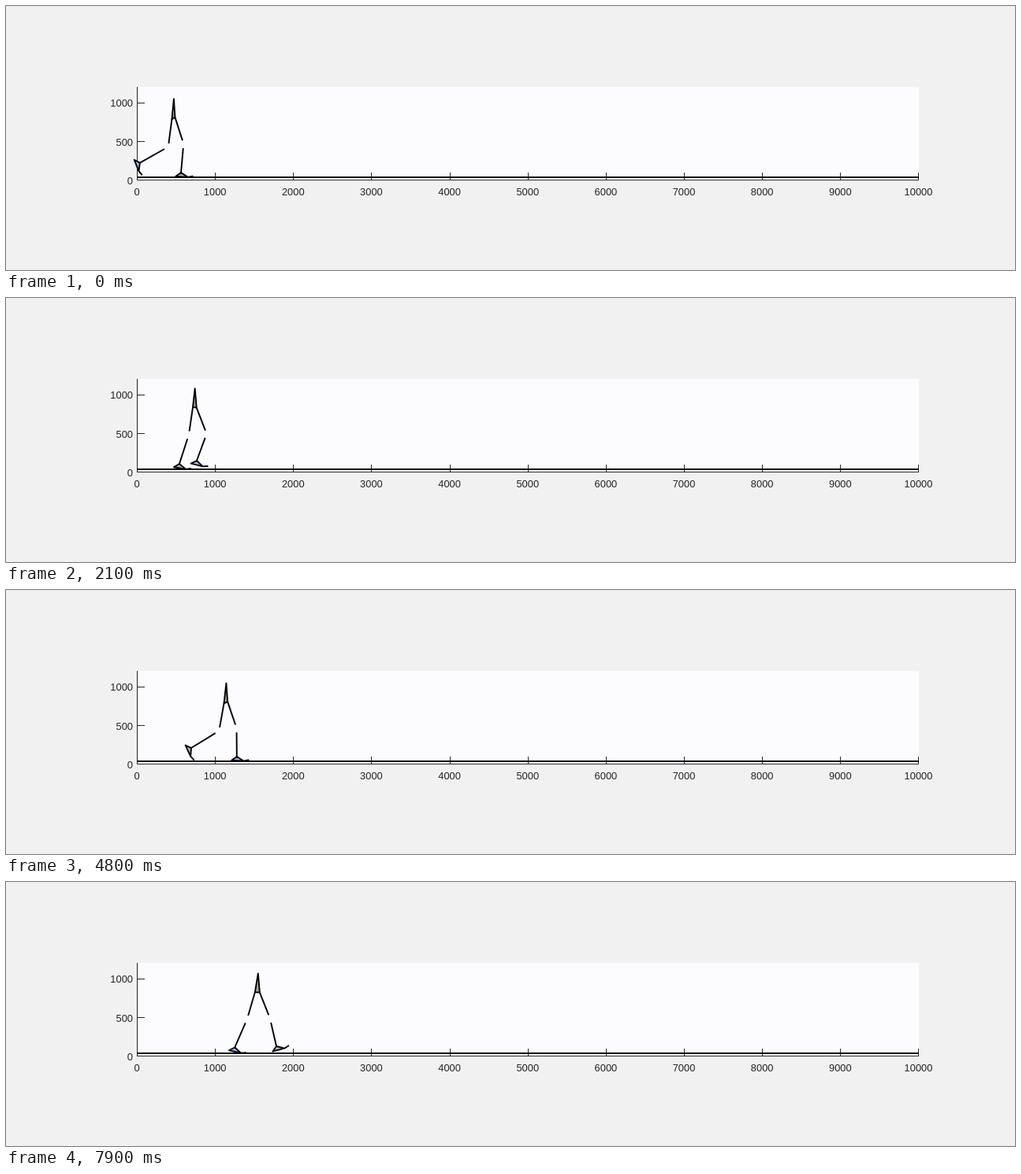
These frames come from a looping animation (1280x336 px, 8000 ms). An HTML page:

```html
<!DOCTYPE html>
<html lang="en">
<head>
<meta charset="utf-8">
<title>Walking gait</title>
<style>
  html, body { margin: 0; width: 100%; height: 100%; overflow: hidden; background: #f1f1f2; }
  svg { display: block; width: 100%; height: 100%; }
  text { font: 12.9px "Liberation Sans", Arial, sans-serif; fill: #262626; }
  .axis { stroke: #262626; stroke-width: 1; fill: none; shape-rendering: crispEdges; }
  .body { stroke: #000; stroke-width: 1.9; stroke-linejoin: round; fill: none; }
</style>
</head>
<body>
<svg viewBox="0 0 1280 336">
  <rect x="166" y="103" width="992" height="119" fill="#fcfcff"/>
  <g id="labels"></g>
  <path id="axes" class="axis"/>
  <path d="M166 218H1158" stroke="#000" stroke-width="1.9"/>
  <g class="body">
    <path id="pelvis" fill="#a6a6a0"/>
    <path id="footA" fill="#a9b8ee"/>
    <path id="footB" fill="#b9afbd"/>
    <path id="limbs"/>
  </g>
</svg>
<script>
const LOOP = 8000, TICK = 100;
const STEP = 5.1, STRIDE = 2 * STEP, STEP_LEN = 71;
const $ = id => document.getElementById(id);

// Smooth monotone curve through a few [time, value] points of one stride;
// each further stride adds `gain`
function cycle(points, gain = 0) {
  const n = points.length;
  const at = i => {
    const turn = Math.floor(i / n), [t, v] = points[i - turn * n];
    return [t + turn * STRIDE, v + turn * gain];
  };
  const slope = i => {
    const [t0, v0] = at(i), [t1, v1] = at(i + 1);
    return (v1 - v0) / (t1 - t0);
  };
  const tangent = i => {
    const a = slope(i - 1), b = slope(i);
    return a * b <= 0 ? 0 : 2 * a * b / (a + b);
  };
  return time => {
    const turn = Math.floor(time / STRIDE), t = time - turn * STRIDE;
    let i = n - 1;
    while (at(i)[0] > t) i--;
    const [t0, p] = at(i), [t1, q] = at(i + 1), h = t1 - t0, u = (t - t0) / h;
    return turn * gain + p + (q - p) * u * u * (3 - 2 * u)
      + h * u * (1 - u) * (tangent(i) * (1 - u) - tangent(i + 1) * u);
  };
}

// Stride of one leg, from mid stance over push-off and swing to the next landing
const ankleX = cycle([[0, 222], [3.3, 219], [4.8, 235], [7.2, 313], [7.9, 343], [8.9, 361]], 2 * STEP_LEN);
const ankleY = cycle([[0, 212], [3.3, 210], [5.4, 199], [6.6, 205], [8.4, 210]]);
const thighSwing = cycle([[0, 11], [3.3, -14], [5.1, -6.5], [6.7, 13], [8.4, 13.5]]);
const footTilt = cycle([[0, 2], [3.1, 12], [4.9, 64], [5.7, 68], [8.3, -23], [9.2, 0]]);

// The hip moves on steadily, with a slight sway and bob in every step
const hipAt = t => [
  213 + STEP_LEN * t / STEP - 3.2 * Math.sin(Math.PI * (t - 0.3) / STEP) ** 2,
  117 + 2 * Math.cos(2 * Math.PI * (t - 4.3) / STEP)
];

const path = (...pts) => "M" + pts.map(p => p.map(v => v.toFixed(2)).join(" ")).join("L");

function turned([x, y], dx, dy, deg) {
  const a = deg * Math.PI / 180, c = Math.cos(a), s = Math.sin(a);
  return [x + dx * c - dy * s, y + dx * s + dy * c];
}

// Point `dist` beyond `from` in the direction from a to b
function along(from, a, b, dist) {
  const dx = b[0] - a[0], dy = b[1] - a[1], k = dist / Math.hypot(dx, dy);
  return [from[0] + dx * k, from[1] + dy * k];
}

function pose(hip, time, shift) {
  const ankle = [ankleX(time) + shift, ankleY(time)];
  const swing = thighSwing(time), tilt = footTilt(time);
  const lean = 0.23 * swing - 1, lift = 212 - ankle[1];
  const top = [hip[0] + lean, hip[1] + 23.5 + 0.2 * lift];
  const thigh = [hip[0] + swing, top[1] + Math.sqrt(31 ** 2 - (swing - lean) ** 2)];
  const knee = along(thigh, top, thigh, 4.5);
  const shin = along(knee, knee, ankle, 5.5);
  const heel = turned(ankle, -6.5, 5, tilt);
  const ball = turned(ankle, 9, 5.6, tilt);
  const tip = turned(ball, 6.8, 0, tilt - 15);
  return {
    top,
    foot: path(heel, ankle, ball) + "Z",
    lines: path(top, thigh) + path(shin, ankle) + path(ball, tip)
  };
}

function draw(ms) {
  const t = Math.floor(ms % LOOP / TICK) * TICK / 1000;
  const hip = hipAt(t);
  const a = pose(hip, t + STEP, -STEP_LEN), b = pose(hip, t, 0);
  $("pelvis").setAttribute("d", path(hip, a.top, b.top) + "Z");
  $("footA").setAttribute("d", a.foot);
  $("footB").setAttribute("d", b.foot);
  $("limbs").setAttribute("d", a.lines + b.lines);
}

function buildAxes() {
  let d = "M166.5 103V222M166 221.5H1158", labels = "";
  const label = (x, y, anchor, value) =>
    labels += `<text x="${x}" y="${y}" text-anchor="${anchor}">${value}</text>`;
  for (let i = 0; i <= 10; i++) {
    const x = 166 + i * 99.15;
    d += `M${Math.round(x - 0.1) + 0.5} 222V212`;
    label(x, 241, "middle", i * 1000);
  }
  for (let i = 0; i <= 2; i++) {
    const y = 222 - i * 49.5;
    if (i) d += `M166 ${Math.floor(y) + 0.5}H175.5`;
    label(161, Math.round(y + 5.2), "end", i * 500);
  }
  $("axes").setAttribute("d", d);
  $("labels").innerHTML = labels;
}

buildAxes();
const start = performance.now();
function frame() {
  draw(performance.now() - start);
  requestAnimationFrame(frame);
}
frame();
</script>
</body>
</html>
```
